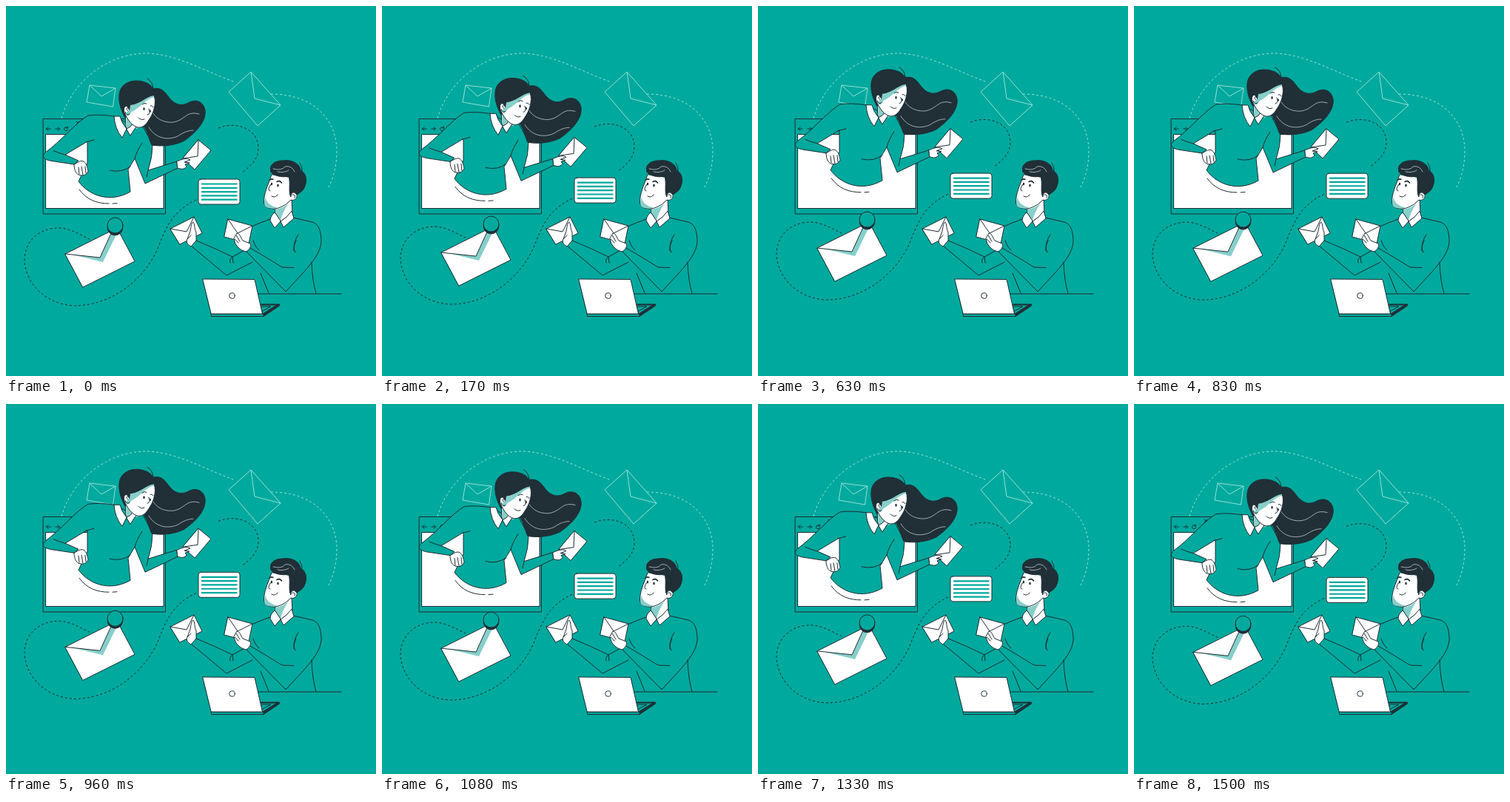
Recreate the animation shown at these times as an HTML page. Size 500x500 px, loop 1540 ms.

```html
<!DOCTYPE html>
<html lang="en">
<head>
<meta charset="utf-8">
<title>Mail exchange</title>
<style>
  html, body { margin: 0; height: 100%; overflow: hidden; background: #00a99d; }
  svg { display: block; width: 100vw; height: 100vh; }
  .line { fill: none; stroke: #1f2d35; stroke-width: 1; stroke-linecap: round; stroke-linejoin: round; }
  .white { fill: #fff; }
  .teal { fill: #00a99d; }
  .dark { fill: #212f37; }
  .shade { fill: #86cfca; stroke: none; }
  .pale { fill: none; stroke: #93e0d8; }
  .dash { stroke-dasharray: 3 3; stroke-linecap: butt; }
  .bold { stroke-width: 1.6; }
  .text { stroke: #00a99d; stroke-width: 2.2; stroke-linecap: butt; }
  .shine { fill: none; stroke: #c3cbce; stroke-width: .8; stroke-linecap: round; }
</style>
</head>
<body>
<svg viewBox="0 0 500 500">
  <!-- background trail and outlined envelopes -->
  <g class="pale">
    <path class="dash" d="M75 152C89 101 140 63 191 64C231 65 270 89 310 103M358 119C419 119 447 157 447 196C447 214 443 231 436 245"/>
    <path d="M113 107L148 111L144.500 136L109 130ZL129 122L148 111"/>
    <path d="M331 89L371 134L340 162L301 116ZL336 125L371 134"/>
  </g>

  <!-- browser window -->
  <g class="line">
    <path class="teal" d="M50.500 152.500H215.500V281H50.500Z"/>
    <path class="white" d="M54 173.500H213V273.500H54Z"/>
    <path d="M60 166H54.500L57 163.500M54.500 166L57 168.500M67 166H72.500L70 163.500M72.500 166L70 168.500M83 164.500A2.500 2.500 0 1 0 83.500 167M83.500 163V165H81.500M95 156L99 160M99 156L95 160"/>
  </g>

  <!-- drifting mail -->
  <g id="mail" class="line">
    <path class="dash" d="M287 165C311 155 341 166 341 192C341 207 331 216 318 226M257 262C223 278 215 303 205 328C188 367 145 405 92 405C51 403 25 372 25 342C26 314 49 299 73 300C88 301 100 309 113 315"/>
    <path class="white" d="M80 335L150 300L174 345L104 380Z"/>
    <path class="shade" d="M90 336L131 346L150 307L143 305L127 340Z"/>
    <path d="M80 335L127 340L143 305"/>
    <circle class="dark" cx="147.500" cy="299.500" r="10.300"/>
    <circle class="teal" cx="147.500" cy="296.500" r="10.500"/>
    <rect class="white" x="260" y="234" width="56" height="34" rx="3.500"/>
    <path class="text" d="M264 240.500H312.500M264 245.800H312.500M264 251.100H312.500M264 256.400H312.500M264 261.700H312.500"/>
  </g>

  <!-- woman leaning out of the window -->
  <g id="woman" class="line">
    <path class="teal" d="M146 149Q126 146 111 148C95 157 74 183 53 198C47 204 52 208 62 209.500L92 214L98 209L80 201L110 183V212L98 237C112 256 140 267 168 251L165 221L174 206L188 240L232 219L231 210L192 222Q198 205 198 187L185 163L174 163Z"/>
    <path d="M64 195.500Q72 199 80 201M108 184L119 181M184 185Q176 197 174 206M140 222Q156 226 168 217M190 231L192 222"/>
    <path d="M99 248C109 262 123 267 139 267M144 267L150 266.500"/>
    <path class="white" d="M92 214C96 212 101 208 105 210C109 213 110 218 111 223C109 229 103 230 98 228C94 226 92 220 92 214ZM98 218L99 227M102 217L104 228M107 217L108 226"/>
    <path class="white" d="M260 181L277 195L255 221L239 206Z"/>
    <path d="M260 181L259 203L239 206"/>
    <path class="white" d="M231 210C236 208 242 205 247 207L249 208L241 211L248 212L242 214L244 217C240 222 236 220 232 219Z"/>
    <path class="dark" d="M194 114C207 107 214 115 219 122C227 133 236 136 246 131C256 125 267 129 269 141C271 157 254 173 241 182C227 189 211 190 197 188C193 180 192 170 186 162Z"/>
    <path class="shine" d="M196 139C201 153 214 158 226 157C243 154 243 141 261 146M193 164C202 179 218 182 232 176C241 170 247 168 253 168"/>
    <path class="white" d="M161 146L162 164L172 164L176 152Z"/>
    <path class="shade" d="M162 148L180 165L168 167L163 165Z"/>
    <path class="white" d="M146 149L154 149Q156 158 163 166L157 178Q147 166 146 149ZM163 166Q169 164 172 158L176 163L168 175Z"/>
    <path class="dark" d="M161 151C154 139 151 125 154 115C158 103 172 99 184 102C194 104 202 111 201 122L166 140Z"/>
    <path d="M191 98Q198 102 199 111"/>
    <path class="white" d="M168 134C181 133 188 123 200 121C204 131 199 146 193 154C189 161 184 165 178 164C171 162 166 156 162 148C157 141 160 133 164 136L167 141Z"/>
    <path class="shade" d="M168 134C181 133 188 123 200 121L200 123C188 126 180 139 170 143L165 149L161 145L167 141Z"/>
    <path d="M184 133Q187 130 190 132M195 135Q198 134 199 137M193 139Q196 146 191 147M179 151Q182 155 187 153M165 137Q161 139 165 142M161 143Q162 149 167 146"/>
    <ellipse class="dark" cx="186.500" cy="139" rx="1.200" ry="2" stroke="none"/>
    <ellipse class="dark" cx="195" cy="142" rx="1" ry="1.800" stroke="none"/>
  </g>

  <!-- man at the desk -->
  <g class="line">
    <path d="M340 389H453M357 288Q345 292 332 298M388 286L414 292C424 295 426 307 426 319C425 333 415 345 402 360L378 386L325 332M330 327Q354 341 373 353L389 353.500M395 309Q388 319 389 331M392 317Q387 326 391 333M334 317Q337 326 342 330M344 361L355 388M413 346Q414 373 419 388"/>
    <path d="M257 317Q282 327 306 339L326 328M250 324L298 364L333 346M306 339Q301 343 303 347M306 339L307 347"/>
    <path class="white" d="M364 272L363 289L371 292L387 279L386 262Z"/>
    <path class="shade" d="M364 275Q376 273 382 266Q374 278 371 290L363 290Z"/>
    <path class="white" d="M363 279Q357 284 357 290L363 300L371 291ZM371 291L375 299L389 287L386 277Q380 286 371 291Z"/>
    <path class="white" d="M359 228C354 242 348 254 348.500 266C350 273 356 274 364 274C374 272 380 267 385 262C390 264 394 259 393 255L385 232Z"/>
    <path class="shade" d="M350 256Q351 269 367 272.500Q350 276 349 267Z"/>
    <path class="dark" d="M358 224C355 214 364 209 374 209C386 207 397 213 398 222C406 226 407 236 404 243C402 250 397 252 393 255C388 249 385 253 385 258C381 251 385 240 382 230C373 232 362 230 358 224Z"/>
    <path d="M397 212Q401 218 400 225"/>
    <path class="shine" d="M361 220Q373 223 377 217Q386 215 390 224M367 224Q376 226 382 222"/>
    <path class="bold" d="M356 235.500Q358 233 361 234.500M366 237.500Q370 235 372.500 239"/>
    <path d="M358 241Q352 249 357 250M359 257Q364 260 367 255M387 255Q392 254 390 259"/>
    <ellipse class="dark" cx="359" cy="240.500" rx="1.100" ry="1.900" stroke="none"/>
    <ellipse class="dark" cx="367.500" cy="242.500" rx="1.200" ry="2" stroke="none"/>
    <path class="white" d="M222 301L254 285L265 307L235 322Z"/>
    <path d="M222 301L244 305L254 285"/>
    <path class="white" d="M249 304C250 298 251 292 253 292C256 295 254 302 257 306V317L250 325C245 322 243 319 245 315ZM245 315L250 310"/>
    <path class="white" d="M300 288L333 297L328 321L295 312Z"/>
    <path d="M300 288L313 307L333 297"/>
    <path class="white" d="M308 314L312 307C316 307 317 313 320 317L330 321Q333 325 325 332C319 331 313 327 310 321ZM311 310L316 318M309 315L314 320"/>
    <path class="dark" d="M342 403H369.500V405L348 419.500Z"/>
    <path class="teal" d="M344 404H366L347 416Z"/>
    <path d="M345 406H358L347 412"/>
    <path class="teal" d="M277.500 416H348V419.500H278Z"/>
    <path class="white" d="M266 369L336 369.500L346.500 416H277.500Z"/>
    <circle class="white" cx="305.500" cy="391.500" r="3.800"/>
  </g>
</svg>
<script>
  const LOOP = 1540, FPS = 24;
  const woman = document.getElementById("woman");
  const mail = document.getElementById("mail");
  const shift = (part, y) => part.setAttribute("transform", `translate(0 ${y.toFixed(2)})`);

  // A bobbing wave cut slightly short of a full period, stepped at 24 fps.
  function draw(now) {
    const step = Math.floor((now % LOOP) * FPS / 1000 + 0.1);
    const y = 8.4 * (Math.cos(0.506 + step * 0.1523) - 0.875);
    shift(woman, y);
    shift(mail, y * 0.52);
    requestAnimationFrame(draw);
  }
  draw(performance.now());
</script>
</body>
</html>
```
